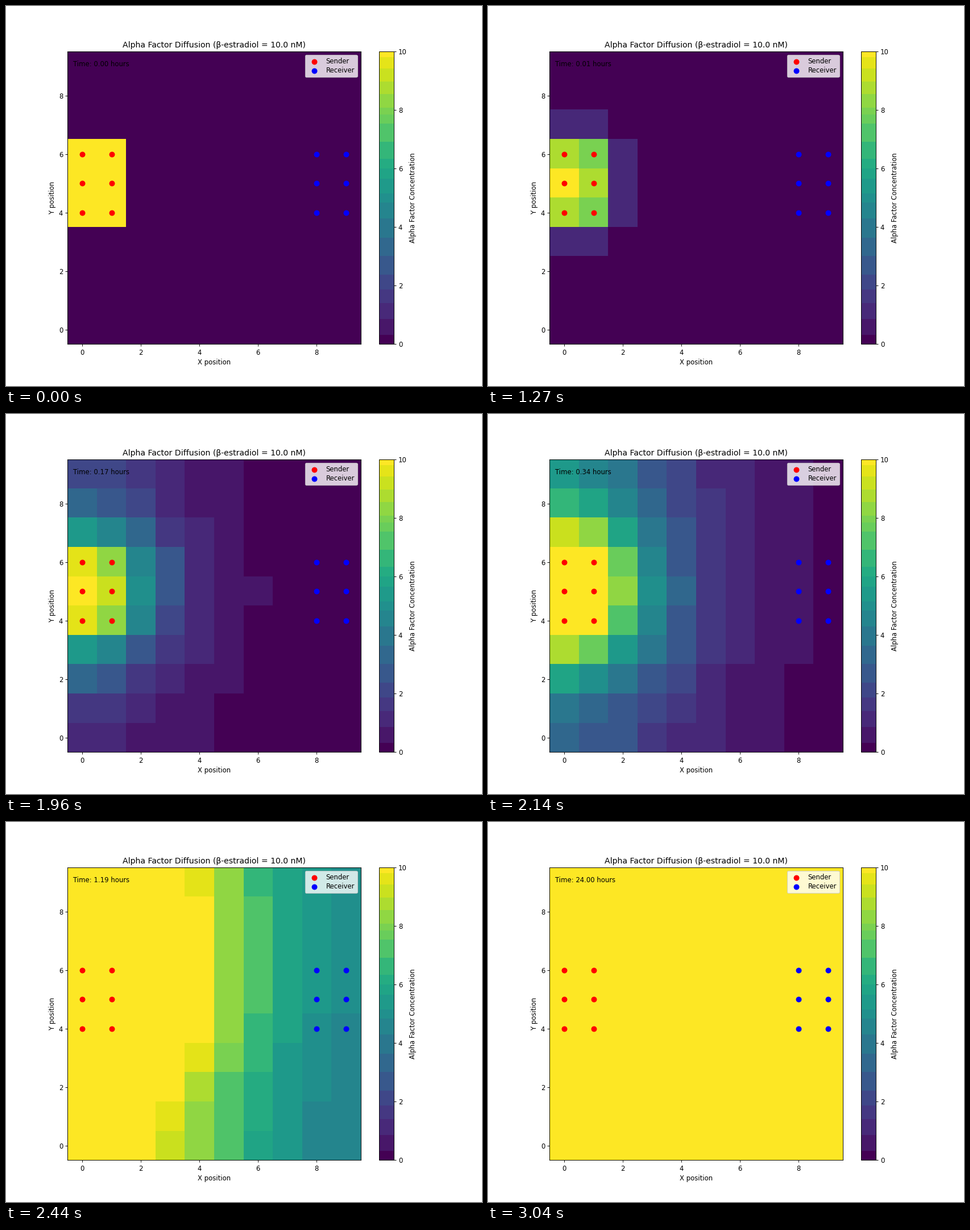
A matplotlib script for the animation above (3.07 s loop, 837 by 669 pixels).

```python
import numpy as np
import matplotlib.pyplot as plt
from matplotlib.animation import FuncAnimation
from matplotlib.colors import ListedColormap

W, H, DPI = 837, 669, 83.7
TICK, LOOP = 10, 3070            # ms
HOLD, STEP = 970, 30             # ms before the first solver step, ms per step

N = 10                           # grid cells per side
DIFFUSION, DECAY = 24.4, 0.14    # per hour
RATE, RAMP = 152.0, 0.06         # sender output per hour, its rise time in hours
START = 10.0

# Simulated hours grow roughly geometrically with the step number.
KEY_STEPS = [0, 17, 24, 39, 46, 49, 69]
KEY_HOURS = [0.0011, 0.0152, 0.057, 0.34, 0.73, 1.19, 24.0]

# Upper edges of the colour bands, in concentration units.
BANDS = [0.33, 0.87, 1.4, 1.88, 2.4, 3.0, 3.65, 4.29, 4.85, 5.14, 5.66,
         6.0, 6.32, 6.93, 7.55, 7.87, 8.1, 8.55, 9.0, 9.4, 9.8]


def banded_viridis():
    edges = np.array([0] + BANDS + [10])
    mids = (edges[:-1] + edges[1:]) / 20
    mids[0], mids[-1] = 0, 1
    colors = plt.get_cmap("viridis")(mids)
    values = (np.arange(256) + 0.5) / 25.6
    return ListedColormap(colors[np.digitize(values, BANDS)])


def no_flux_laplacian(n):
    lap = 2 * np.eye(n) - np.eye(n, k=1) - np.eye(n, k=-1)
    lap[0, 0] = lap[-1, -1] = 1
    return lap


eig, modes = np.linalg.eigh(no_flux_laplacian(N))
decay = DIFFUSION * (eig[:, None] + eig[None, :]) + DECAY
senders = np.zeros((N, N))
senders[4:7, 0:2] = 1
sender_modes = modes.T @ senders @ modes


def concentration(t):
    """Closed-form diffusion with a ramping source, mode by mode."""
    fade = np.exp(-decay * t)
    made = (1 - fade) / decay - (np.exp(-t / RAMP) - fade) / (decay - 1 / RAMP)
    return modes @ (sender_modes * (START * fade + RATE * made)) @ modes.T


def hours(ms):
    if ms < HOLD:
        return 0.0
    step = (ms - HOLD) // STEP
    return float(np.exp(np.interp(step, KEY_STEPS, np.log(KEY_HOURS))))


plt.rcParams["font.family"] = "DejaVu Sans"
fig, ax = plt.subplots(figsize=((W + 1e-6) / DPI, (H + 1e-6) / DPI), dpi=DPI)
image = ax.imshow(concentration(0), cmap=banded_viridis(), vmin=0, vmax=10,
                  origin="lower", interpolation="nearest")
fig.colorbar(image, ax=ax, label="Alpha Factor Concentration")

for columns, color, name in (((0, 1), "red", "Sender"),
                             ((8, 9), "blue", "Receiver")):
    x, y = np.meshgrid(columns, (4, 5, 6))
    ax.scatter(x.ravel(), y.ravel(), s=57, c=color, label=name)

ax.set_xlim(-0.5, N - 0.5)
ax.set_ylim(-0.5, N - 0.5)
ax.set_title("Alpha Factor Diffusion (β-estradiol = 10.0 nM)")
ax.set_xlabel("X position")
ax.set_ylabel("Y position")
ax.legend(loc="upper right", labelspacing=0.32)
clock = ax.text(0.0185, 0.95, "", transform=ax.transAxes, color="black")


def update(i):
    t = hours(i * TICK)
    image.set_data(concentration(t))
    clock.set_text(f"Time: {t:.2f} hours")
    return image, clock


anim = FuncAnimation(fig, update, frames=LOOP // TICK, interval=TICK,
                     repeat=True, repeat_delay=0)
plt.show()
```
